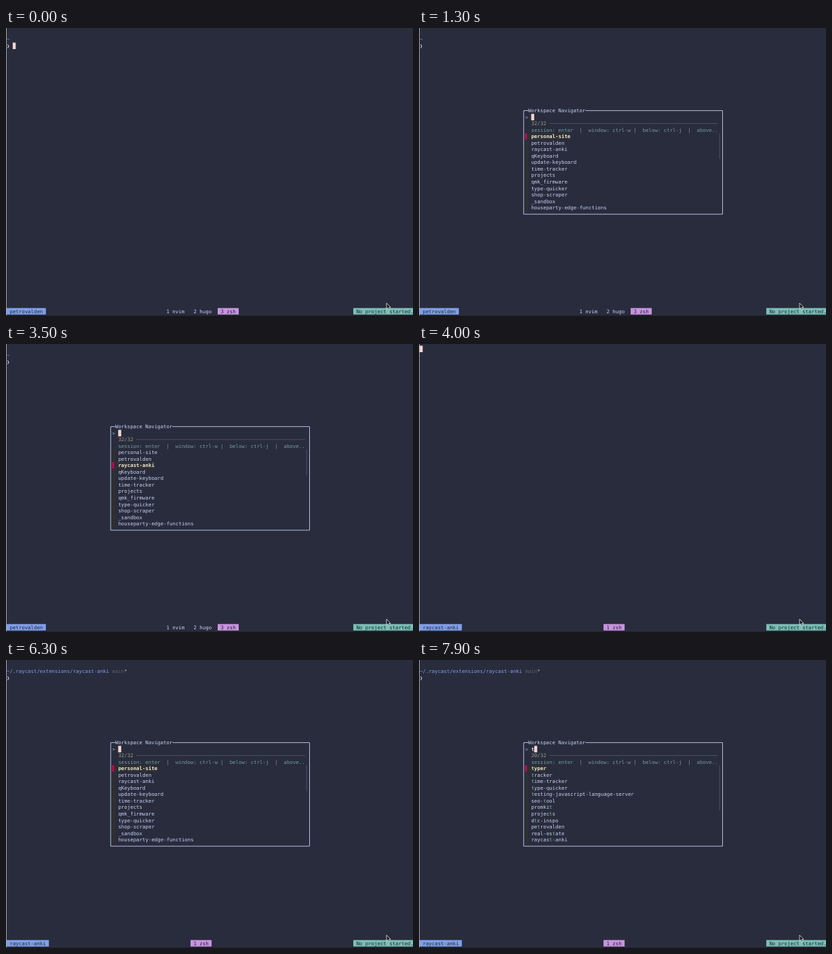
Animation, 600 px wide and 424 px high, one loop 8000 ms. Source, as an HTML page:

```html
<!DOCTYPE html>
<html lang="en">
<head>
<meta charset="utf-8">
<title>Workspace Navigator</title>
<style>
  html, body { margin: 0; width: 100%; height: 100%; overflow: hidden; background: #292c3c; }
  svg { display: block; width: 600px; height: 424px; }
  text {
    font: 7.38px "DejaVu Sans Mono", monospace;
    text-rendering: geometricPrecision;
    white-space: pre;
    fill: #c6d0f5;
  }
  .bold { font-weight: bold; }
  .dark { fill: #232634; }
  .path { fill: #7f9ff0; }
  .arrow { fill: #e3cfe6; }
  .git { fill: #606067; }
  .dirty { fill: #ef8fb8; }
  .prompt { fill: #87afd7; }
  .info { fill: #9d9d80; }
  .header { fill: #729c9f; }
  .current { font-weight: bold; fill: #e8e4de; }
  .match { fill: #87af87; }
  .current .match { fill: #afd7af; }
</style>
</head>
<body>
<svg id="stage" viewBox="0 0 600 424"></svg>
<script>
const LOOP = 8000;
const CELL_W = 4.443, CELL_H = 9.53, LEFT = 1, TOP = 2.5;
const BLUE = '#809fe9', MAUVE = '#c793de', TEAL = '#79bfb5', CURSOR = '#f2d5cf';
const GUTTER = '#303030', POINTER = '#d7005f', RULE = '#555660';
const USER = 'petrovalden';

const stage = document.getElementById('stage');
const layers = [];
const colX = col => LEFT + col * CELL_W;
const rowY = row => TOP + row * CELL_H;

function add(parent, tag, attrs) {
  const node = document.createElementNS('http://www.w3.org/2000/svg', tag);
  for (const key in attrs) node.setAttribute(key, attrs[key]);
  return parent.appendChild(node);
}

// A group visible from one time until another.
function layer(from, to) {
  const node = add(stage, 'g', {});
  layers.push({ node, from, to });
  return node;
}

function text(parent, col, row, string, cls = '') {
  const node = add(parent, 'text', { x: colX(col), y: rowY(row) + 7.3, class: cls });
  node.textContent = string;
  return node;
}

function block(parent, col, row, cols, fill, rows = 1) {
  add(parent, 'rect', {
    x: colX(col), y: rowY(row), width: cols * CELL_W, height: rows * CELL_H, fill
  });
}

function line(parent, d, stroke) {
  add(parent, 'path', { d, stroke, fill: 'none', 'stroke-width': 0.9 });
}

function pill(parent, col, label, fill) {
  block(parent, col, 43, label.length + 2, fill);
  text(parent, col + 1, 43, label, 'dark');
}

// Shortest fuzzy match: scan forward for its end, then back for its start.
function matchPositions(item, query) {
  let end = -1;
  for (const ch of query) end = item.indexOf(ch, end + 1);
  const found = new Set();
  for (const ch of [...query].reverse()) {
    end = item.lastIndexOf(ch, end);
    found.add(end--);
  }
  return found;
}

function listItem(parent, row, item, query, current) {
  block(parent, 35, row, 1, GUTTER);
  if (current) {
    block(parent, 36, row, item.length + 1, GUTTER);
    block(parent, 35, row, 0.6, POINTER);
  }
  const node = text(parent, 37, row, '', current ? 'current' : '');
  const hits = matchPositions(item, query);
  [...item].forEach((ch, i) => {
    if (hits.has(i)) add(node, 'tspan', { class: 'match' }).textContent = ch;
    else node.append(ch);
  });
}

function popupFrame(from, to) {
  const g = layer(from, to);
  const x1 = colX(34.5), x2 = colX(100.5), y1 = rowY(12.5), y2 = rowY(28.5);
  line(g, `M${colX(36)} ${y1}H${x1}V${y2}H${x2}V${y1}H${colX(55)}`, '#c6d0f5');
  text(g, 36, 12, 'Workspace Navigator');
}

function results(from, to, { query, count, items }, selected = 0) {
  const g = layer(from, to);
  const info = `${count}/32`;
  text(g, 35, 13, '>', 'prompt');
  text(g, 37, 13, query, 'bold');
  block(g, 37 + query.length, 13, 1, CURSOR);
  text(g, 37, 14, info, 'info');
  line(g, `M${colX(38 + info.length)} ${rowY(14.5)}H${colX(99)}`, RULE);
  text(g, 37, 15, 'session: enter  |  window: ctrl-w |  below: ctrl-j  |  above..', 'header');
  items.forEach((item, i) => listItem(g, 16 + i, item, query, i === selected));
  if (count > 12) {
    const rows = Math.floor(144 / count);
    line(g, `M${colX(99.5)} ${rowY(16)}V${rowY(16 + rows)}`, RULE);
  }
}

const all = {
  query: '', count: 32,
  items: ['personal-site', USER, 'raycast-anki', 'qKeyboard', 'update-keyboard', 'time-tracker',
    'projects', 'qmk_firmware', 'type-quicker', 'shop-scraper', '_sandbox',
    'houseparty-edge-functions']
};
const byT = {
  query: 't', count: 20,
  items: ['typer', 'tracker', 'time-tracker', 'type-quicker', 'testing-javascript-language-server',
    'seo-tool', 'promkit', 'projects', 'dtc-inspo', USER, 'real-estate', 'raycast-anki']
};
const byTi = {
  query: 'ti', count: 8,
  items: ['time-tracker', 'testing-javascript-language-server', 'houseparty-edge-functions',
    'dtc-inspo', 'type-quicker', 'raycast-anki', 'auto-video-maker', 'auto-video-maker-server']
};
const byTim = {
  query: 'tim', count: 3,
  items: ['time-tracker', 'auto-video-maker', 'auto-video-maker-server']
};

function cursor(from, to, col, row) {
  block(layer(from, to), col, row, 1, CURSOR);
}

// Window edges
add(stage, 'rect', { width: 600, height: 424, fill: '#292c3c' });
add(stage, 'rect', { width: 1, height: 424, fill: '#a4a6b0' });
add(stage, 'rect', { y: 423, width: 600, height: 1, fill: '#222430' });

// First session
const home = layer(0, 3600);
text(home, 0, 1, '~', 'path');
text(home, 0, 2, '❯', 'arrow');
pill(home, 0, USER, BLUE);
text(home, 53, 43, '1 nvim');
text(home, 62, 43, '2 hugo');
pill(home, 70, '3 zsh', MAUVE);
cursor(0, 500, 2, 2);

popupFrame(500, 3600);
cursor(500, 600, 35, 13);
results(600, 1500, all, 0);
results(1500, 1900, all, 1);
results(1900, 2300, all, 2);
results(2300, 2900, all, 3);
results(2900, 3600, all, 2);

// Second session
const anki = layer(3600, LOOP);
pill(anki, 0, 'raycast-anki', BLUE);
pill(anki, 61, '1 zsh', MAUVE);
cursor(3600, 4600, 0, 0);

const shell = layer(4600, LOOP);
text(shell, 0, 1, '~/.raycast/extensions/raycast-anki', 'path');
text(shell, 0, 2, '❯', 'arrow');
text(layer(4700, LOOP), 35, 1, 'main', 'git');
text(layer(5000, LOOP), 39, 1, '*', 'dirty');
cursor(4600, 5600, 2, 2);

popupFrame(5600, LOOP);
cursor(5600, 5700, 35, 13);
results(5700, 6500, all);
results(6500, 6700, byT);
results(6700, 6800, byTi);
results(6800, 7500, byTim);
results(7500, 7700, byTi);
results(7700, LOOP, byT);

// Always on top
pill(stage, 115, 'No project started.', TEAL);
add(stage, 'path', {
  d: 'M561 405V413.6L562.9 411.9L564.2 414.8L565.7 414.1L564.4 411.3H567Z',
  fill: '#14151c', stroke: '#f0f0f0', 'stroke-width': 0.8, 'stroke-linejoin': 'round'
});

const start = performance.now();
function tick() {
  const t = (performance.now() - start) % LOOP;
  for (const { node, from, to } of layers) {
    node.style.display = t >= from && t < to ? '' : 'none';
  }
  requestAnimationFrame(tick);
}
tick();
</script>
</body>
</html>
```
